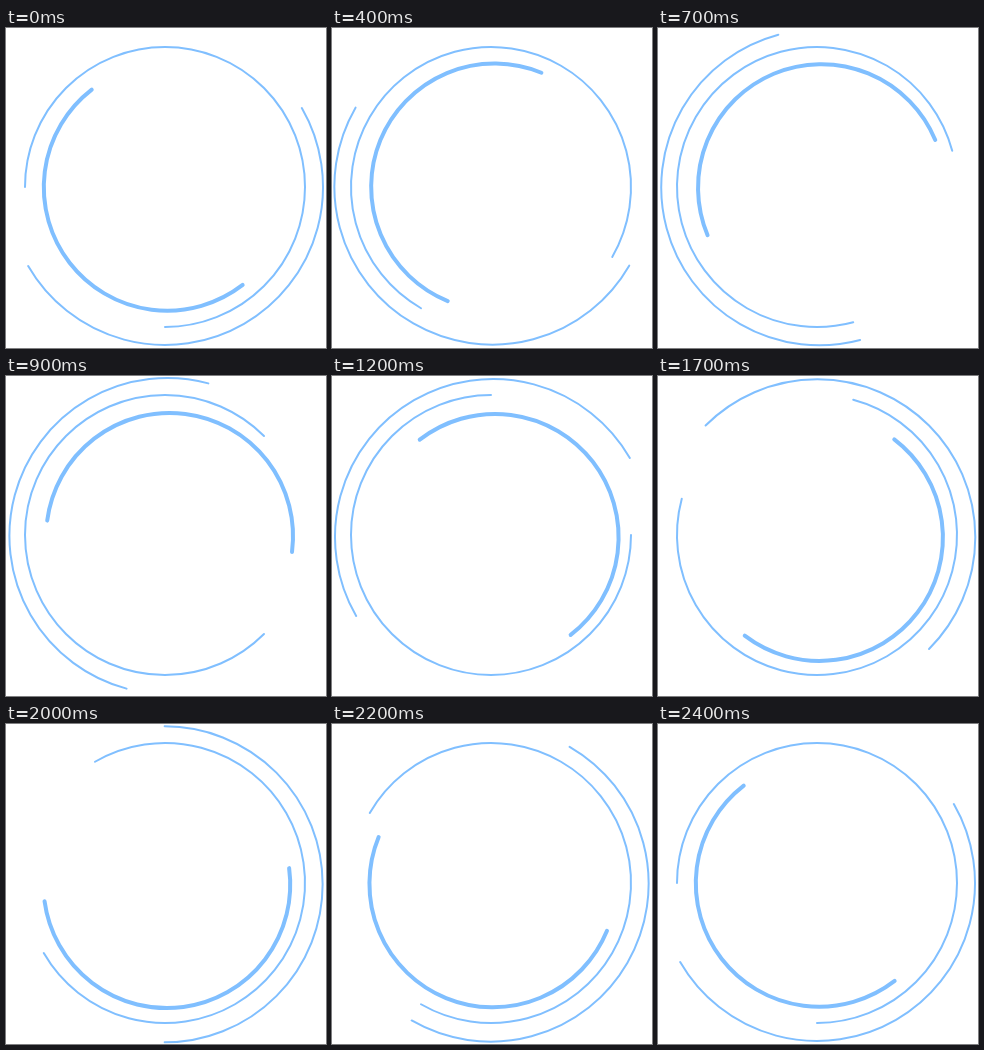
An HTML page with a canvas that plays this animation: 320x320 px, repeating every 2.5 s.

```html
<!DOCTYPE html>
<html lang="en">
<head>
<meta charset="utf-8">
<title>Rotating arcs</title>
<style>
  html, body { margin: 0; width: 100%; height: 100%; overflow: hidden; background: #fff; }
  canvas { display: block; }
</style>
</head>
<body>
<canvas id="stage" width="320" height="320"></canvas>
<script>
const ctx = document.getElementById('stage').getContext('2d');
const LOOP = 2500, STEP = 100, TURN = 15;
const rad = deg => deg * Math.PI / 180;

// Pivot, centre offset from it, radius, start and sweep in degrees, direction, line width
const arcs = [
  { x: 160, y: 160, off: -1, r: 158, start: -30, sweep: 180, dir: 1, width: 2 },
  { x: 159, y: 159, off: 0, r: 140, start: 180, sweep: 270, dir: -1, width: 2 },
  { x: 162.2, y: 160.3, off: -1, r: 123.4, start: 52.3, sweep: 180, dir: 1, width: 4 }
];

function drawArc(a, turn) {
  ctx.save();
  ctx.translate(a.x, a.y);
  ctx.rotate(rad(a.dir * turn));
  ctx.lineWidth = a.width;
  ctx.beginPath();
  ctx.arc(a.off, a.off, a.r, rad(a.start), rad(a.start + a.sweep));
  ctx.stroke();
  ctx.restore();
}

function draw() {
  // A full turn takes 24 steps; the last step rests on the starting pose.
  const turn = Math.floor(performance.now() % LOOP / STEP) * TURN;
  ctx.fillStyle = '#fff';
  ctx.fillRect(0, 0, 320, 320);
  ctx.strokeStyle = '#80bfff';
  ctx.lineCap = 'round';
  arcs.forEach(a => drawArc(a, turn));
  requestAnimationFrame(draw);
}
draw();
</script>
</body>
</html>
```
